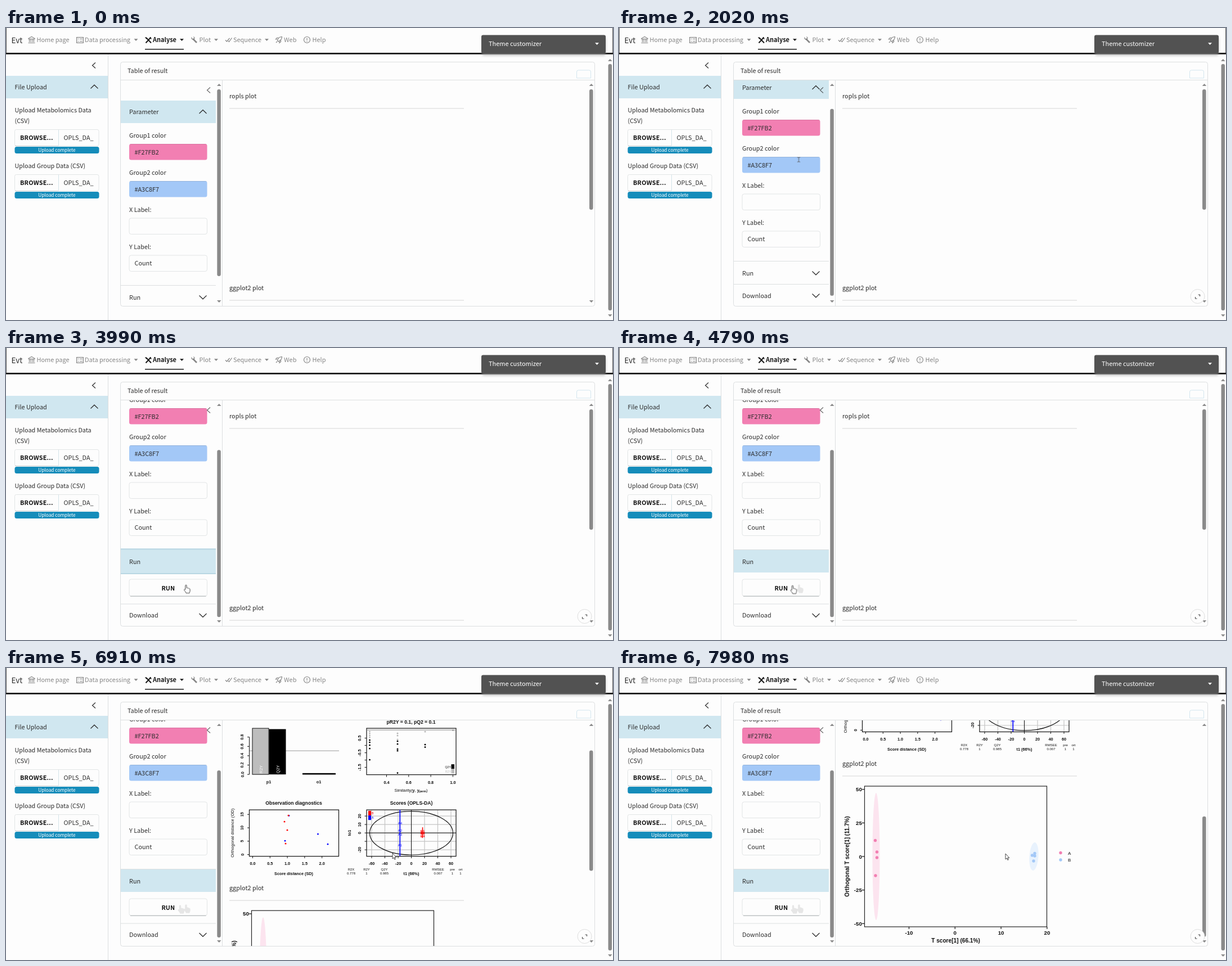
Animation of 1079x519 px, one loop 8000 ms. Source, as an HTML page:

```html
<!DOCTYPE html>
<html lang="en">
<head>
<meta charset="utf-8">
<title>Analysis dashboard</title>
<style>
@property --left { syntax: '<number>'; inherits: true; initial-value: 0; }
@property --open { syntax: '<number>'; inherits: true; initial-value: 0; }
@property --right { syntax: '<number>'; inherits: true; initial-value: 0; }

html, body { margin: 0; width: 100%; height: 100%; overflow: hidden; background: #fdfdfd; }
svg {
  display: block; width: 100%; height: 100%;
  font: 10.85px 'Noto Sans CJK SC', 'Noto Sans CJK JP', 'Noto Sans CJK', 'Open Sans', sans-serif;
  fill: #2c2c2c;
  animation: left 8s linear infinite, open 8s linear infinite, right 8s linear infinite;
}
#plots { font-family: 'Liberation Sans', Arial, sans-serif; fill: #111; animation: plots 8s step-end infinite; }
.nav { font-size: 10.95px; fill: #868686; }
.icon { fill: none; stroke: #868686; stroke-width: 1.2; }
.bold { font-weight: 700; }
.line { fill: none; stroke: #dcdfe0; }
.chev { fill: none; stroke: #2c2c2c; stroke-width: 1.2; }
.box { fill: #fdfdfd; stroke: #e2e5e6; }
.head { fill: #d0e7f0; }
.thumb { fill: #8a8a8a; }
.small { font-size: 8.3px; fill: #fff; text-anchor: middle; }

#form { transform: translateY(calc(var(--left) * -1px)); }
#below { transform: translateY(calc(var(--open) * 55.5px)); }
#formThumb {
  height: calc(332px - var(--open) * 35px);
  transform: translateY(calc(var(--left) * (.81 - var(--open) * .08) * 1px));
}
#results { transform: translateY(calc(var(--right) * -1px)); }
#resultThumb { transform: translateY(calc(var(--right) * .53px)); }
#runChev { transform-box: fill-box; transform-origin: center; transform: rotate(calc(var(--open) * 180deg)); }
#runHead { animation: runHead 8s step-end infinite; }
#runFocus { animation: runFocus 8s step-end infinite; }
#expand { animation: expand 8s step-end infinite; }
#trail1 { animation: trail1 8s step-end infinite; }
#trail2 { animation: trail2 8s step-end infinite; }
#cursor { animation: move 8s ease-in-out infinite; }
#arrow { animation: arrow 8s step-end infinite; }
#beam { animation: beam 8s step-end infinite; }
#hand { animation: hand 8s step-end infinite; }
#cursor path { stroke: #333; stroke-width: .9; fill: #fff; stroke-linejoin: round; }
#cursor #beam { fill: none; stroke: #555; }

@keyframes left {
  0%, 15.9% { --left: 0; } 17.2% { --left: 32; } 19% { --left: 43; }
  46.3% { --left: 43; } 48% { --left: 88; } 49.6%, 79.25% { --left: 99; } 80%, 100% { --left: 100; }
}
@keyframes open { 0%, 41.6% { --open: 0; } 46%, 100% { --open: 1; } }
@keyframes right {
  0%, 85% { --right: 0; } 86.4% { --right: 71.5; } 87.2% { --right: 75; }
  89.2%, 90.4% { --right: 150; } 91.6% { --right: 184.5; } 94% { --right: 220; }
  96.4%, 98.1% { --right: 225; } 99.7%, 100% { --right: 292; }
}
@keyframes plots { 0% { visibility: hidden; } 75.75%, 100% { visibility: visible; } }
@keyframes runHead { 0% { visibility: hidden; } 41.6%, 100% { visibility: visible; } }
@keyframes runFocus { 0% { visibility: hidden; } 41.6% { visibility: visible; } 53%, 100% { visibility: hidden; } }
@keyframes expand { 0% { visibility: hidden; } 4.8%, 100% { visibility: visible; } }
@keyframes trail1 { 0% { visibility: hidden; } 54.5%, 100% { visibility: visible; } }
@keyframes trail2 { 0% { visibility: hidden; } 79.3%, 100% { visibility: visible; } }
@keyframes move {
  0%, 2.8% { transform: translate(480px, -20px); }
  8.9%, 11.2% { transform: translate(331px, 195px); }
  14%, 18% { transform: translate(326px, 214px); }
  25%, 27% { transform: translate(319.5px, 234px); }
  36.9% { transform: translate(327px, 427px); }
  37.5%, 46.5% { transform: translate(327px, 430px); }
  49.6%, 52.9% { transform: translate(320px, 421.5px); }
  56%, 79.2% { transform: translate(308.5px, 422.5px); }
  84.8%, 87% { transform: translate(687px, 329px); }
  91%, 100% { transform: translate(687px, 330px); }
}
@keyframes arrow { 0% { visibility: visible; } 7.7% { visibility: hidden; } 30% { visibility: visible; } 35.5% { visibility: hidden; } 79.5%, 100% { visibility: visible; } }
@keyframes beam { 0% { visibility: hidden; } 7.7% { visibility: visible; } 30%, 100% { visibility: hidden; } }
@keyframes hand { 0% { visibility: hidden; } 35.5% { visibility: visible; } 79.5%, 100% { visibility: hidden; } }
</style>
</head>
<body>
<svg viewBox="0 0 1079 519">
  <defs>
    <clipPath id="formClip"><path d="M204 93H384V494H204z"/></clipPath>
    <clipPath id="resultClip"><path d="M385 93H1036V494H385z"/></clipPath>
    <path id="down" d="M-6.5-3 0 3.3 6.5-3"/>
    <path id="up" d="M-6.5 3 0-3.3 6.5 3"/>
    <path id="back" d="M3-5-2.5 0 3 5"/>
    <path id="caret" d="M-3.5-1.8h7L0 2z"/>
    <path id="handShape" d="M-1.2 8V1a1.2 1.2 0 0 1 2.4 0v4c1-.6 2 0 2.2.5 1-.5 1.9 0 2.1.7 1-.2 1.6.4 1.6 1.3v2.6c0 2-1 2.5-1 4h-6c0-1.5-1.5-2.6-3.4-5.2-.8-1.2.8-2.2 2.1-.9z"/>
    <filter id="soft" x="-10%" y="-50%" width="120%" height="220%"><feGaussianBlur stdDeviation="2"/></filter>
  </defs>
  <rect width="1079" height="519" fill="#fdfdfd"/>

  <!-- navigation -->
  <path d="M.5 0V45M1078.5 0V45" stroke="#555"/>
  <rect y="44" width="1079" height="2.8" fill="#191919"/>
  <text x="9.5" y="27" font-size="13.5">Evt</text>
  <g class="icon">
    <path d="M40 19.5V18.500L45.500 15.500 51 18.500V19.500zM41.500 20v5M44 20v5M47 20v5M49.500 20v5M39.500 26.500h12"/>
    <path d="M125.600 16.600h11.800v9.800h-11.800zM127.500 19.500h2M127.500 23.500h2M131 19.500h5M131 23.500h5"/>
    <path d="M332 19 339 26" stroke-width="2.600"/><path d="M330 16.500v2.500l2.500 1.500 2-1 .5-2-1.500-2"/>
    <path d="M390 21.500l2.500 2.500 5-6M395 23l1.500 1.500 5-7"/>
    <path d="M482.500 22c1-4 4-6.500 8-6.500 0 4-2.500 7-6.500 8.500zM482 20h-2.500l2-2.500h2.500M486 23.500v3l2.500-2v-2.500M480 26l2-2"/>
    <circle cx="535" cy="21" r="5.500"/><path d="M535 17.800v4M535 23v1.500"/>
  </g>
  <g fill="none" stroke="#191919" stroke-width="2"><path d="M249 17l9 9.500M257.500 16.500l-9 10"/><path d="M247.500 16.500l3 3M255.500 17l3 2.500" stroke-width="1.400"/></g>
  <g class="nav">
    <text x="54.500" y="25.300">Home page</text><text x="140" y="25.300">Data processing</text>
    <text x="261" y="25.300" class="bold" fill="#191919">Analyse</text>
    <text x="343.500" y="25.300">Plot</text><text x="404" y="25.300">Sequence</text>
    <text x="494" y="25.300">Web</text><text x="544.500" y="25.300">Help</text>
    <use href="#caret" x="231" y="21"/><use href="#caret" x="312.500" y="21" fill="#191919"/>
    <use href="#caret" x="373.500" y="21"/><use href="#caret" x="463.500" y="21"/>
  </g>
  <rect x="247" y="37" width="69" height="1.500" fill="#191919"/>
  <rect x="846" y="16" width="220" height="33" rx="4" fill="#999" opacity=".6" filter="url(#soft)"/>
  <rect x="845" y="12.500" width="221" height="32.500" rx="3" fill="#525252"/>
  <text x="858" y="32.300" fill="#fff" font-size="10.950">Theme customizer</text>
  <use href="#caret" x="1050.500" y="28" fill="#fff"/>

  <!-- page scrollbar and upload sidebar -->
  <rect class="thumb" x="1070.500" y="64" width="6.500" height="438" rx="3.200"/>
  <g class="thumb"><path d="M1070 59h7.500l-3.700-4z"/><path d="M1070 509h7.500l-3.700 4z"/></g>
  <path class="line" d="M181.500 47V519"/>
  <use href="#back" class="chev" x="156" y="66.500"/>
  <rect class="head" y="85" width="181" height="40"/>
  <text x="15.500" y="109">File Upload</text>
  <use href="#up" class="chev" x="157" y="104.500"/>
  <text x="15.500" y="150">Upload Metabolomics Data</text><text x="15.500" y="168.500">(CSV)</text>
  <text x="15.500" y="248.700">Upload Group Data (CSV)</text>
  <g id="upload">
    <rect class="box" x="15.500" y="180.500" width="149.500" height="29" rx="3"/>
    <path d="M16 209.500h77" stroke="#c9cdce"/><path d="M93.500 181v29" stroke="#d4e4ea"/>
    <text x="25" y="198.700" class="bold" letter-spacing=".200" fill="#111">BROWSE...</text>
    <text x="102.500" y="199.300">OPLS_DA_</text>
    <rect x="15.500" y="211" width="150" height="12" rx="3.500" fill="#158cba"/>
    <text x="90.500" y="220" class="small">Upload complete</text>
  </g>
  <use href="#upload" y="80"/>

  <!-- parameter form -->
  <g clip-path="url(#formClip)">
    <g id="form">
      <rect class="head" x="204" y="129" width="169" height="40"/>
      <text x="219" y="153">Parameter</text><use href="#up" class="chev" x="350" y="149"/>
      <text x="219" y="194.700">Group1 color</text>
      <rect x="219" y="206" width="138.500" height="28.500" rx="3.500" fill="#f27fb2"/><text x="228.500" y="224.500">#F27FB2</text>
      <text x="219" y="260.500">Group2 color</text>
      <rect x="219" y="272" width="138.500" height="28.500" rx="3.500" fill="#a3c8f7"/><text x="228.500" y="290.500">#A3C8F7</text>
      <path d="M220 206.500h136.500M220 272.500h136.500" stroke="#000" opacity=".1"/>
      <text x="219" y="326.500">X Label:</text><rect class="box" x="219" y="338" width="138.500" height="28.500" rx="3.500"/>
      <text x="219" y="392.500">Y Label:</text><rect class="box" x="219" y="404" width="138.500" height="28.500" rx="3.500"/>
      <text x="228.500" y="422.300">Count</text>
      <path class="line" d="M204 457.500H373"/>
      <rect id="runHead" class="head" x="204" y="458" width="169" height="40"/>
      <g id="runFocus"><rect class="head" x="204" y="455.500" width="169" height="45.500"/><path d="M204 456.500h169M204 500h169" stroke="#b9d7e3" stroke-width="2"/></g>
      <text x="219" y="482.500">Run</text><use id="runChev" href="#down" class="chev" x="350" y="478.500"/>
      <g>
        <rect class="box" x="219" y="510" width="138.500" height="30" rx="3.500"/>
        <path d="M221 540.300h134.500" stroke="#c3c7c8" stroke-width="1.400"/>
        <text x="288.300" y="529.500" class="bold" text-anchor="middle" fill="#111">RUN</text>
      </g>
      <g id="below">
        <rect x="204" y="501" width="169" height="130" fill="#fdfdfd"/>
        <path class="line" d="M204 498.500H373"/>
        <text x="219" y="522.800">Download</text><use href="#down" class="chev" x="350" y="518.500"/>
      </g>
    </g>
    <g fill="#e6e6e6" stroke="#e6e6e6">
      <use id="trail1" href="#handShape" x="320" y="421"/>
      <use id="trail2" href="#handShape" x="309.500" y="422"/>
    </g>
    <use href="#back" class="chev" stroke-opacity=".7" x="360" y="110.500"/>
    <rect id="formThumb" class="thumb" x="375.300" y="109" width="6.500" height="332" rx="3.200"/>
    <g class="thumb"><path d="M375 103h7.500l-3.700-4z"/><path d="M375 484h7.500l-3.700 4z"/></g>
  </g>

  <!-- results -->
  <g clip-path="url(#resultClip)">
    <g id="results">
      <text x="397" y="125.300">ropls plot</text><text x="397" y="465.500">ggplot2 plot</text>
      <path d="M397 143H814M397 484H814" stroke="#d5d5d5"/>
      <g id="plots"></g>
    </g>
  </g>
  <rect id="resultThumb" class="thumb" x="1037" y="109" width="6.500" height="214" rx="3.200"/>
  <g class="thumb"><path d="M1036.700 103h7.500l-3.700-4z"/><path d="M1036.700 484h7.500l-3.700 4z"/></g>
  <rect class="line" x="203.500" y="60.500" width="843" height="434" rx="4"/>
  <path class="line" d="M204 92.500H1046M384.500 93V494"/>
  <text x="216" y="80">Table of result</text>
  <path d="M1014.500 89V78q0-3 3-3h19q3 0 3 3V89z" fill="#fdfdfd" stroke="#d3e6ef"/>
  <g id="expand">
    <circle cx="1028.500" cy="477" r="12.500" fill="#fdfdfd" stroke="#dedede"/>
    <path d="M1029.500 474h3v3M1027.500 481h-3v-3" fill="none" stroke="#555" stroke-width="1.200"/>
  </g>

  <g id="cursor">
    <path id="arrow" d="M0 0v10l2.300-2 1.600 3.400 1.500-.7-1.600-3.300h3z"/>
    <path id="beam" d="M-2.500-4h1.500q1 0 1 1v6q0 1-1 1h-1.500M2.500-4h-1.500q-1 0-1 1M2.500 4h-1.500q-1 0-1-1"/>
    <g id="hand"><path d="M-1.200 8V1a1.200 1.200 0 0 1 2.400 0v4c1-.6 2 0 2.200.5 1-.5 1.900 0 2.100.7 1-.2 1.600.4 1.600 1.300v2.600c0 2-1 2.500-1 4h-6c0-1.500-1.500-2.600-3.400-5.200-.8-1.200.8-2.200 2.100-.9z"/></g>
  </g>
</svg>
<script>
const parts = [];
const add = markup => parts.push(markup);
const text = (x, y, s, { size = 7.3, bold = true, rot = 0, anchor = 'middle', fill = '#111' } = {}) =>
  add(`<text x="${x}" y="${y}" font-size="${size}" text-anchor="${anchor}" fill="${fill}"` +
      `${bold ? ' font-weight="700"' : ''}${rot ? ` transform="rotate(${rot} ${x} ${y})"` : ''}>${s}</text>`);
const rect = (x, y, w, h, fill, stroke = 'none', width = 1) =>
  add(`<rect x="${x}" y="${y}" width="${w}" height="${h}" fill="${fill}" stroke="${stroke}" stroke-width="${width}"/>`);
const path = (d, stroke = '#111', width = 1) => add(`<path d="${d}" fill="none" stroke="${stroke}" stroke-width="${width}"/>`);
const oval = (x, y, rx, ry, fill, more = '') => add(`<ellipse cx="${x}" cy="${y}" rx="${rx}" ry="${ry}" fill="${fill}" ${more}/>`);
const dots = (points, fill, r) => points.forEach(([x, y]) => oval(x, y, r, r, fill));
const column = (x, ys, fill) => dots(ys.map(y => [x, y]), fill, 1.4);
const ticksX = (labels, x0, step, y) => labels.forEach((s, i) => {
  const x = x0 + i * step;
  path(`M${x} ${y}v3.500`);
  text(x, y + 15.500, s);
});
const ticksY = (labels, y0, step, x) => labels.forEach((s, i) => {
  const y = y0 + i * step;
  path(`M${x} ${y}h-3.500`);
  if (s) text(x - 10, y, s, { rot: -90 });
});
const title = (x, y, s) => text(x, y, s, { size: 8.65 });
const frame = (x, y) => rect(x, y, 159, 82.5, 'none', '#111', 1.2);

// variance bars
path('M433 218H592', '#999');
rect(438, 178, 29, 82, '#bdbdbd', '#111');
rect(467.5, 179.5, 30, 80.5, '#000');
rect(527, 257.7, 59, 2.6, '#000');
path('M432.500 193.500V260');
ticksY(['0.0', '0.2', '0.4', '0.6', '0.8'], 260, -16.6, 432.5);
text(455.5, 258, 'R2Y', { rot: -90, anchor: 'start', bold: false, fill: '#fff' });
text(485.5, 258, 'Q2Y', { rot: -90, anchor: 'start', bold: false, fill: '#fff' });
text(467, 276, 'p1');
text(556, 276, 'o1');

// permutation test
title(720, 169.5, 'pR2Y = 0.1, pQ2 = 0.1');
frame(641, 178);
path('M641 181H800', '#888');
ticksX(['0.4', '0.6', '0.8', '1.0'], 676.5, 39.3, 261);
ticksY(['0.5', '', '-0.5', '', '-1.5'], 195.5, 13, 641);
column(646.5, [184, 187.5, 191, 194.500], '#b5b5b5');
column(646.5, [199, 203, 208, 214, 234], '#000');
column(696, [187, 191, 198], '#b5b5b5');
column(696, [201, 206, 215, 218, 257.5], '#000');
column(745, [184], '#b5b5b5');
column(745, [207, 211.5], '#000');
column(794.5, [181.5], '#999');
rect(791.5, 242, 5.5, 8.300, '#000');
rect(791.5, 250.3, 5.5, 8, '#bdbdbd');
text(791, 248.5, 'Q2Y', { size: 5.3, bold: false, anchor: 'end' });
text(791, 256.500, 'R2Y', { size: 5.3, bold: false, anchor: 'end', fill: '#bbb' });
text(720, 290.5, 'Similarity(<tspan font-weight="700">y</tspan>, <tspan font-weight="700">y<tspan font-size="5" dy="1.500">perm</tspan></tspan><tspan dy="-1.500">)</tspan>', { bold: false });

// observation diagnostics
title(511.5, 314, 'Observation diagnostics');
frame(432.5, 323);
ticksX(['0.0', '0.5', '1.0', '1.5', '2.0'], 438.5, 30.8, 405.5);
ticksY(['0', '5', '10', '15'], 402.5, -23.8, 432.5);
text(404.5, 364, 'Orthogonal distance (OD)', { size: 7.65, bold: false, rot: -90 });
text(511.5, 438.5, 'Score distance (SD)');
dots([[503, 333.300], [496, 378], [554.5, 366], [572, 384]], '#00f', 1.4);
dots([[502, 333], [495, 344], [500, 359], [497, 383]], '#f00', 1.4);

// scores
title(720.5, 314, 'Scores (OPLS-DA)');
for (let i = -3; i <= 3; i++) path(`M${720.5 + i * 23.500} 323V405`, '#c4c4c4', 1.2);
for (let i = -2; i <= 2; i++) path(`M641 ${364 - i * 15}H800`, '#c4c4c4', 1.2);
path('M641 364H800M720.500 323V405');
oval(720.5, 364.3, 74, 38.8, 'none', 'stroke="#111" stroke-width="1.200"');
frame(641, 323);
ticksX([-60, -40, -20, 0, 20, 40, 60], 650, 23.5, 405.5);
ticksY(['20', '10', '0', '', '-20'], 334, 15, 641);
path('M700.300 323V405', '#00f', 1.7);
[348.5, 361.5, 368.5, 388].forEach((y, i) => text(700.5, y, 'A' + [4, 2, 3, 1][i], { size: 6, bold: false, fill: '#00f' }));
path('M740.500 354V373', '#f00', 1.5);
[363, 365.5, 367, 372].forEach((y, i) => text(740.500, y, 'B' + (i + 1), { size: 6, fill: '#f00' }));
rect(644, 324.7, 5, 8.300, '#f00');
rect(644, 333, 5, 8, '#00f');
text(650, 331, 'B', { size: 5.3, bold: false, anchor: 'start', fill: '#f00' });
text(650, 339, 'A', { size: 5.3, bold: false, anchor: 'start', fill: '#00f' });
text(613, 364, 'to1', { rot: -90 });
text(720.5, 438.5, 't1 (66%)');
[[613.5, 'R2X', '0.778'], [641, 'R2Y', 1], [672.5, 'Q2Y', '0.985'], [768, 'RMSEE', '0.007'], [793.5, 'pre', 1], [808, 'ort', 1]]
  .forEach(([x, name, value]) => {
    text(x, 431, name, { size: 6, bold: false });
    text(x, 438.3, value, { size: 6, bold: false });
  });

// score scatter
const pink = '#f27fb2', blue = '#a3c8f7', zero = 627;
oval(457, zero, 6.5, 113, '#fce4ef');
oval(737.5, zero, 8, 25, '#e8f2fd', `transform="rotate(4 737.500 ${zero})"`);
dots([[455.5, 598.5], [458.5, 619], [458.5, 629], [456, 661]], pink, 2.7);
dots([[739, 621.5], [734.5, 625], [739, 626], [737, 635]], blue, 2.7);
rect(436.5, 502, 324, 250, 'none', '#222', 1.2);
for (let v = -50; v <= 50; v += 25) {
  const y = zero - v * 2.385;
  path(`M436 ${y}h-4`, '#111', 1.2);
  text(432, y + 3.5, v, { size: 9.8, anchor: 'end' });
}
for (let v = -10; v <= 20; v += 10) {
  const x = 597.3 + v * 8.18;
  path(`M${x} 752v4`, '#111', 1.2);
  text(x, 765.5, v, { size: 9.8 });
}
text(598.5, 779.5, 'T score[1] (66.1%)', { size: 10.15 });
text(409, zero, 'Orthogonal T score[1] (11.7%)', { size: 10.15, rot: -90 });
dots([[785, 620.500]], pink, 2.7);
dots([[785, 633]], blue, 2.7);
text(798, 623.500, 'A', { size: 8, bold: false, anchor: 'start' });
text(798, 636, 'B', { size: 8, bold: false, anchor: 'start' });

document.getElementById('plots').innerHTML = parts.join('');
</script>
</body>
</html>
```
